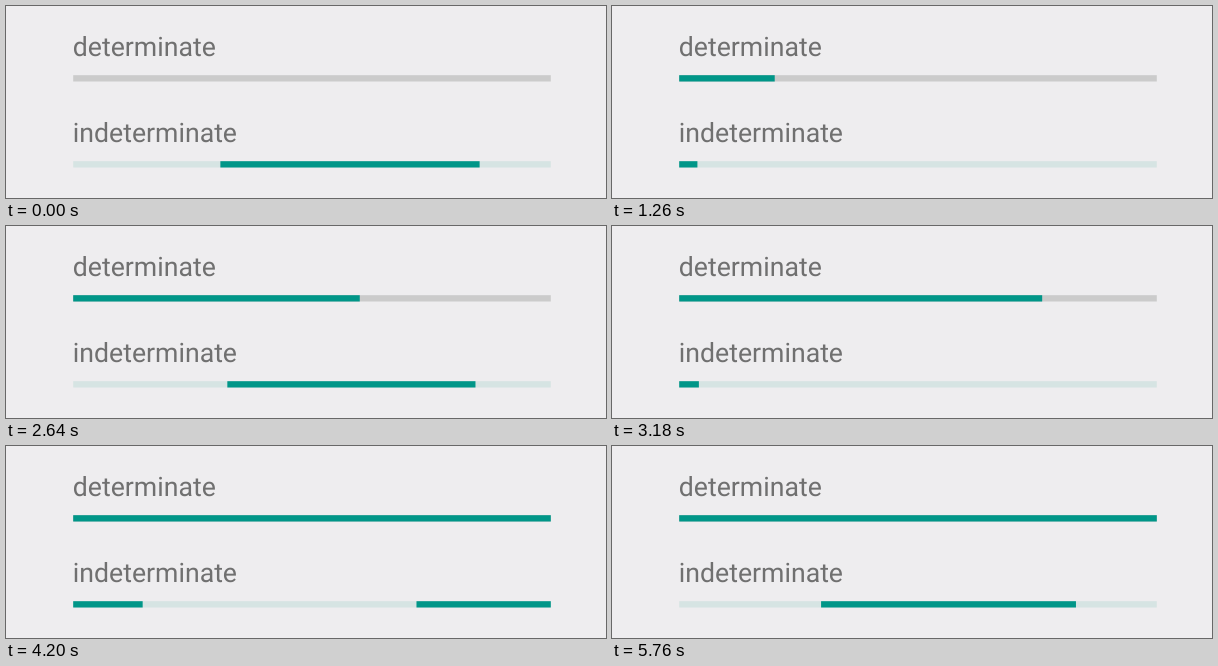
An HTML page that plays this animation: 600 by 192 pixels, repeating every 5.82 s.

```html
<!DOCTYPE html>
<html lang="en">
<head>
<meta charset="utf-8">
<title>Progress bars</title>
<style>
  html, body { margin: 0; width: 100%; height: 100%; overflow: hidden; background: #eeedef; }
  svg { display: block; width: 600px; height: 192px; }
  text { font: 26.67px Roboto, sans-serif; fill: #707070; text-rendering: geometricPrecision; }
  rect { height: 6.3px; }
  .bar { fill: #009688; }
</style>
</head>
<body>
<svg viewBox="0 0 600 192">
  <text x="66.8" y="50">determinate</text>
  <rect x="67.2" y="69.2" width="477.6" fill="#cbcbcb"/>
  <rect id="value" class="bar" y="69.2"/>
  <text x="66.8" y="136">indeterminate</text>
  <rect x="67.2" y="155.2" width="477.6" fill="#d6e4e3"/>
  <rect id="lead" class="bar" y="155.2"/>
  <rect id="chase" class="bar" y="155.2"/>
</svg>
<script>
const LEFT = 67.2, WIDTH = 477.6, STEP = 60, STEPS = 97;

// Cycles completed at a few steps; the pace drifts slightly
const pace = [[0, .3825], [53, 2.0417], [70, 2.592], [96, 3.375]];

const clamp = v => Math.min(1, Math.max(0, v));
const span = (t, from, to) => clamp((t - from) / (to - from));
const easeOut = (p, power) => 1 - (1 - p) ** power;

function cycles(step) {
  const i = Math.max(1, pace.findIndex(([s]) => s >= step));
  const [s0, c0] = pace[i - 1], [s1, c1] = pace[i];
  return c0 + (c1 - c0) * (step - s0) / (s1 - s0);
}

// Fill the track between two fractions of its width
function fill(id, from, to) {
  const bar = document.getElementById(id);
  bar.setAttribute('x', LEFT + WIDTH * from);
  bar.setAttribute('width', WIDTH * (to - from));
}

function draw(now) {
  const step = Math.floor(now / STEP) % STEPS;
  fill('value', 0, clamp(Math.round(1.75 * step - 16.6) / 100));

  // Each end of a moving bar crosses the track with its own easing
  const t = cycles(step) % 1;
  const tail = span(t, .12, .69);
  fill('lead', .58 * tail + .42 * tail ** 3, span(t, .014, .437) ** 1.17);
  fill('chase', easeOut(span(t, .7, .985), 1.65), easeOut(span(t, .565, .845), 1.55));
}

const start = performance.now();
function tick() {
  draw(performance.now() - start);
  requestAnimationFrame(tick);
}
tick();
</script>
</body>
</html>
```
